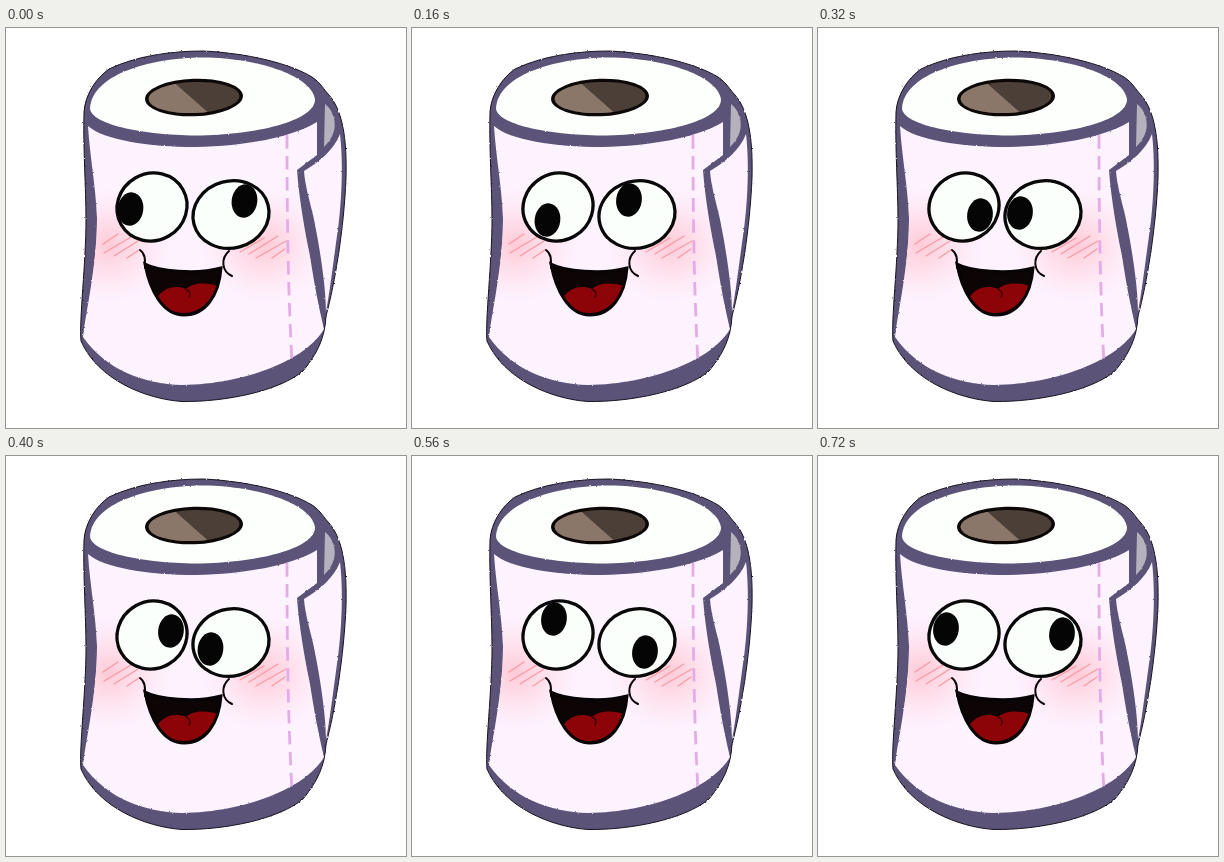
Recreate the animation shown at these times as an HTML page. Size 400 by 400 pixels, loop 800 ms.

```html
<!DOCTYPE html>
<html lang="en">
<head>
<meta charset="utf-8">
<title>Dizzy paper roll</title>
<style>
  html, body { margin: 0; width: 100%; height: 100%; overflow: hidden; background: #fff; }
  svg { display: block; width: 100vw; height: 100vh; }
</style>
</head>
<body>
<svg viewBox="0 0 400 400">
  <defs>
    <filter id="rough" filterUnits="userSpaceOnUse" x="0" y="0" width="400" height="400">
      <feTurbulence type="fractalNoise" baseFrequency="0.35" numOctaves="2" seed="4"/>
      <feDisplacementMap in="SourceGraphic" scale="2" xChannelSelector="R" yChannelSelector="G"/>
    </filter>
    <radialGradient id="blush">
      <stop offset="0" stop-color="#ffc3cf" stop-opacity=".85"/>
      <stop offset=".4" stop-color="#ffd0dc" stop-opacity=".6"/>
      <stop offset="1" stop-color="#ffe0ee" stop-opacity="0"/>
    </radialGradient>
    <path id="front" d="M82 98 C98 112 142 119 190 119 C238 118 284 110 311 94 L311 127 L291 142
      C293 170 299 205 304 228 C308 255 313 280 318 301 C300 332 240 356 176 357
      C138 356 100 342 77 309 C80 282 91 238 91 190 C90 160 84 130 82 98 Z"/>
    <clipPath id="frontClip"><use href="#front"/></clipPath>
    <clipPath id="holeClip">
      <ellipse cx="188" cy="69.500" rx="45.500" ry="15.500" transform="rotate(-2 188 69.5)"/>
    </clipPath>
    <path id="lips" d="M139 236 C152 243 190 247 215 240 C213 268 199 287 178 287 C157 287 144 263 139 236 Z"/>
    <clipPath id="mouthClip"><use href="#lips"/></clipPath>
  </defs>

  <g filter="url(#rough)">
    <!-- roll outline -->
    <path fill="#5b5278" stroke="#17121f" stroke-width="1" d="M78 84 C79 67 90 50 103 41 C130 28 165 23 197 23
      C240 25 283 35 306 49 C315 55 318 62 323 67 C337 83 341 112 340 150 C338 200 329 255 320 288
      C319 310 311 326 297 343 C273 363 220 374 176 373.500 C140 371 92 352 75 313
      C73 292 80 235 80 192 C80 160 77 120 78 84 Z"/>
    <path fill="#b5b2bd" d="M319 76 C328 83 330 94 328 103 C326 110 322 115 318 119 Z"/>
    <path fill="#fdf3ff" d="M298 143 C313 134 328 122 334 106 C338 140 335 185 330 215
      C326 245 323 268 320 284 C320 255 312 210 307 187 C303 170 299 157 298 143 Z"/>
    <use href="#front" fill="#fdf3ff"/>
    <path fill="#fdfffc" d="M84 80 C86 48 140 30 197 29.500 C255 30 307 49 309 72
      C308 93 250 107 190 107.500 C135 107 84 96 84 80 Z"/>
  </g>

  <g clip-path="url(#frontClip)" fill="url(#blush)">
    <ellipse cx="103" cy="217" rx="66" ry="60"/>
    <ellipse cx="258" cy="217" rx="66" ry="60"/>
  </g>

  <g fill="none" stroke-linecap="round">
    <ellipse cx="188" cy="69.500" rx="49" ry="18.800" fill="#0d0808" transform="rotate(-2 188 69.5)"/>
    <g clip-path="url(#holeClip)">
      <rect x="140" y="50" width="96" height="40" fill="#4b3f37"/>
      <path fill="#8a776a" d="M140 50 H163 L206 88 H140 Z"/>
    </g>
    <path stroke="#e5abe8" stroke-width="2.800" stroke-linecap="butt" stroke-dasharray="13.500 7.500"
      d="M281 107 C281 190 282 260 286 336"/>
    <path stroke="#f99ba6" stroke-width="1.400" d="M97 216 L112 206 M98 225 L125 209 M108 228 L132 213 M121 230 L133 222
      M234 224 L258 210 M243 226 L272 208 M250 230 L280 213 M266 230 L279 221"/>
    <use href="#lips" fill="#0c0405"/>
    <g clip-path="url(#mouthClip)">
      <path fill="#8c0308" d="M151 270 C156 261 168 256 180 261 C187 255 200 254 211 258
        C207 272 194 285 178 285 C165 285 157 279 151 270 Z"/>
      <path stroke="#3d0204" stroke-width="1.500" d="M180 261 C184 263 185 266 183 269"/>
    </g>
    <use href="#lips" stroke="#080406" stroke-width="3"/>
    <path stroke="#080406" stroke-width="2" d="M134 222 C140 226 139 234 139 240 M223 223 C215 230 215 243 226 248"/>
    <g fill="#fbfffb" stroke="#080808" stroke-width="3.300">
      <ellipse cx="146" cy="179" rx="35.500" ry="33.500" transform="rotate(-30 146 179)"/>
      <ellipse cx="225" cy="186.500" rx="38.300" ry="33.500" transform="rotate(-15 225 186.5)"/>
    </g>
    <g fill="#050505">
      <ellipse id="left" rx="12.800" ry="16.700"/>
      <ellipse id="right" rx="12.800" ry="16.700"/>
    </g>
  </g>
</svg>
<script>
  const STEP = 80;
  // pupil centres, one pose per step
  const poses = {
    left: [[124.5, 181], [127, 187], [135.5, 192], [151, 193], [162, 187],
           [165, 175], [155, 163], [142, 163], [133, 167], [128, 173]],
    right: [[238.5, 173], [229, 169], [217, 172], [207, 177], [202, 185],
            [204.5, 193], [218, 198], [233, 196], [241, 189], [244, 178]]
  };
  const eyes = Object.keys(poses).map(id => [document.getElementById(id), poses[id]]);

  function draw(time) {
    const step = Math.floor(time / STEP) % 10;
    for (const [pupil, path] of eyes) {
      const [x, y] = path[step];
      pupil.setAttribute("transform", `translate(${x} ${y}) rotate(8)`);
    }
  }

  const start = performance.now();
  function tick() {
    draw(performance.now() - start);
    requestAnimationFrame(tick);
  }
  tick();
</script>
</body>
</html>
```
